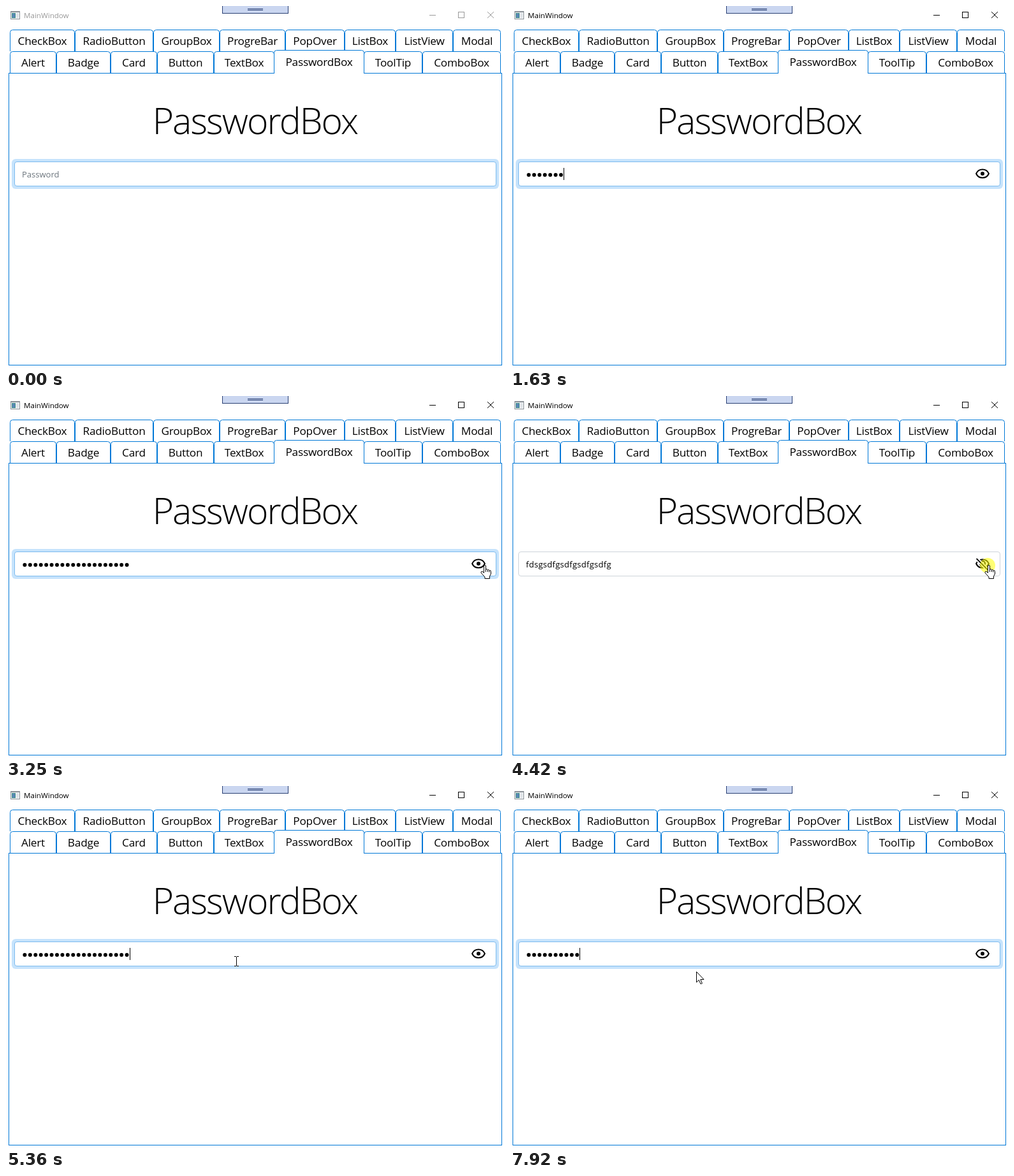
An HTML page with a canvas for the animation above (8000 ms loop, 781 by 568 pixels).

```html
<!DOCTYPE html>
<html lang="en">
<head>
<meta charset="utf-8">
<title>MainWindow</title>
<style>
  html, body { margin: 0; width: 100%; height: 100%; overflow: hidden; background: #fff; }
  canvas { display: block; }
</style>
</head>
<body>
<canvas id="stage" width="781" height="568"></canvas>
<script>
const ctx = document.getElementById('stage').getContext('2d');
const LOOP = 8000, TICK = 80;
const BLUE = '#0078d7';
const SANS = '"Open Sans", "Noto Sans", sans-serif';
const SECRET = 'fdsgsdfgsdfgsdfgsdfg';
const LABEL = { align: 'center', spacing: -0.2 };

const rows = [
  { y: 37, names: ['CheckBox', 'RadioButton', 'GroupBox', 'ProgreBar', 'PopOver', 'ListBox', 'ListView', 'Modal'],
    edges: [6, 108, 231, 335, 438, 531, 611, 701, 776] },
  { y: 71, names: ['Alert', 'Badge', 'Card', 'Button', 'TextBox', '', 'ToolTip', 'ComboBox'],
    edges: [6, 79, 164, 237, 326, 421, 561, 653, 776] }
];

// Pointer way points: time, x, y of the hot spot
const route = [
  [130, 681, 550], [290, 300, 385], [450, 99, 271], [600, 98, 271], [770, 98, 270],
  [2640, 180, 277], [2940, 743, 236], [3250, 751, 266], [4500, 751, 266],
  [4740, 600, 288], [5120, 377, 268], [5210, 375, 275],
  [6980, 58, 283], [7150, 70, 293], [7300, 70, 293], [7920, 292, 291]
];

const eye = new Path2D('M2.1 11.5C3.8 7.5 7.6 5 12 5s8.2 2.5 9.9 6.5C20.2 15.5 16.4 18 12 18S3.8 15.5 2.1 11.5z');
const arrow = new Path2D('M.5 .5V17L4.3 13.4 7 19.6 9.4 18.6 6.8 12.5H12z');
const hand = new Path2D('M5.5 12V2q0-1.5 1.5-1.5T8.5 2V7q2.5-1 3 .8 2-.8 2.6.8 2.4-.4 2.4 2V14L14.5 18v3.5H7V19L1.5 13q-1.5-2 .3-2.6Q4 10 5.5 12.5z');
const knuckles = new Path2D('M8.5 7v4M11.5 8v3M14 9v2.5');

const within = (t, ...spans) => spans.some(([a, b]) => t >= a && t < b);
const ticks = (t, from) => Math.floor((t - from) / TICK);
const caretX = n => Math.floor(25.4 + 8.43 * n);

function text(str, x, y, size, color, { align = 'left', weight = 400, spacing = 0 } = {}) {
  ctx.font = `${weight} ${size}px ${SANS}`;
  ctx.letterSpacing = spacing + 'px';
  ctx.textAlign = align;
  ctx.fillStyle = color;
  ctx.fillText(str, x, y);
}

function rect(x, y, w, h, color) {
  ctx.fillStyle = color;
  ctx.fillRect(x, y, w, h);
}

function line(color, width, ...pts) {
  ctx.strokeStyle = color;
  ctx.lineWidth = width;
  ctx.beginPath();
  pts.forEach(([x, y]) => ctx.lineTo(x, y));
  ctx.stroke();
}

function disc(x, y, r, color) {
  ctx.fillStyle = color;
  ctx.beginPath();
  ctx.arc(x, y, r, 0, 7);
  ctx.fill();
}

function box(x, y, w, h, r, fill, stroke) {
  ctx.beginPath();
  ctx.roundRect(x, y, w, h, r);
  ctx.fillStyle = fill;
  ctx.fill();
  if (stroke) {
    ctx.strokeStyle = stroke;
    ctx.lineWidth = 1;
    ctx.stroke();
  }
}

function at(x, y, draw) {
  ctx.save();
  ctx.translate(x, y);
  draw();
  ctx.restore();
}

function outlined(path) {
  ctx.fillStyle = '#fff';
  ctx.fill(path);
  ctx.strokeStyle = '#000';
  ctx.lineWidth = 1;
  ctx.stroke(path);
}

function tab(a, b, y, bottom) {
  const l = a + 0.5, r = b - 0.5, top = y + 0.5;
  ctx.beginPath();
  ctx.moveTo(l, bottom);
  ctx.arcTo(l, top, r, top, 4);
  ctx.arcTo(r, top, r, bottom, 4);
  ctx.lineTo(r, bottom);
  ctx.fillStyle = '#fff';
  ctx.fill();
  ctx.strokeStyle = BLUE;
  ctx.lineWidth = 1;
  ctx.stroke();
}

function titleBar(active) {
  const ink = active ? '#000' : '#999';
  rect(7, 8, 15, 13, '#8b9197');
  rect(8, 10, 13, 10, '#f4f6f8');
  rect(9, 11, 6, 8, '#3f8f86');
  rect(10, 12, 4, 6, '#5a86b8');
  rect(16, 11, 4, 8, '#dfe3e7');
  text('MainWindow', 28, 19, 11.6, ink);
  rect(664, 14, 10, 1, ink);
  ctx.strokeStyle = ink;
  ctx.lineWidth = 1;
  ctx.strokeRect(709.5, 9.5, 9, 9);
  line(ink, 1, [755, 9], [765, 19]);
  line(ink, 1, [765, 9], [755, 19]);

  rect(339, 0, 104, 12, '#293f73');
  rect(340, 0, 102, 11, '#cad6f0');
  rect(379, 4, 24, 1, '#293f73');
  rect(379, 6, 24, 1, '#293f73');
}

function tabs() {
  ctx.strokeStyle = BLUE;
  ctx.lineWidth = 1;
  ctx.strokeRect(4.5, 105.5, 773, 458);
  for (const { y, names, edges } of rows) {
    names.forEach((name, i) => {
      const a = edges[i], b = edges[i + 1];
      if (!name) return;
      tab(a, b, y, y + 34);
      text(name, (a + b) / 2, y + 24, 17.2, '#000', LABEL);
    });
  }
  tab(420, 562, 69, 106);
  text('PasswordBox', 491, 94, 17.2, '#000', LABEL);
  text('PasswordBox', 390.5, 201, 57, '#000', { align: 'center', weight: 300, spacing: -1.9 });
}

function drawEye(crossed) {
  at(729, 251.5, () => {
    ctx.strokeStyle = '#000';
    ctx.lineWidth = 2;
    ctx.stroke(eye);
    if (crossed) {
      ctx.beginPath();
      ctx.arc(12, 11.5, 4, 0, 7);
      ctx.stroke();
      line('#fff', 5.5, [2, 3], [21, 22]);
      line('#000', 1.9, [2.6, 3.6], [20.3, 21.3]);
    } else {
      disc(12, 11.5, 3, '#000');
    }
  });
}

function dotCount(t) {
  if (t < 1300) return 0;
  if (t < 2180) return Math.min(14, Math.floor(2.4 + 1.167 * Math.floor((t - 1300) / 79)));
  if (t < 6220) return Math.min(20, 15 + ticks(t, 2180));
  if (t < 7300) return 0;
  return Math.min(10, 2 + Math.floor((t - 7300) / 77.5));
}

function field(t) {
  const n = dotCount(t);
  const focused = !within(t, [3480, 5210]);
  const shown = within(t, [3480, 4500]);
  if (focused) box(9, 240, 764, 47, 6, '#c6e3fc');
  box(13.5, 244.5, 755, 38, 3.5, '#fff', focused ? '#7dbbee' : '#ced4da');

  if (within(t, [5440, 6220])) rect(25, 254, 169, 19, '#99c9ef');
  if (!n) {
    text('Password', 25, 269, 13, '#6c757d');
  } else if (shown) {
    text(SECRET, 25, 269, 13, '#000', { spacing: 0.27 });
  } else {
    for (let i = 0; i < n; i++) disc(29.4 + 8.43 * i, 265, 3, '#000');
  }
  if (n) drawEye(shown);
  if (within(t, [770, 3010], [5210, 5440], [6220, 6840], [7300, LOOP])) {
    rect(caretX(n), 254, 1, 19, '#000');
  }
}

function pointerAt(t) {
  let i = route.length - 1;
  while (i && route[i][0] > t) i--;
  const a = route[i], b = route[i + 1] || a;
  const u = b === a ? 0 : ticks(t, a[0]) * TICK / (b[0] - a[0]);
  return [1, 2].map(k => Math.round(a[k] + (b[k] - a[k]) * u));
}

function pointer(t) {
  if (!within(t, [130, 1010], [2640, 5440], [6980, LOOP])) return;
  const [x, y] = pointerAt(t);
  const inField = y > 244 && y < 284;
  const overEye = inField && x > 728;
  if (within(t, [770, 840], [3410, 4500], [5210, 5290])) {
    disc(overEye ? x - 2 : x, y, 12, 'rgba(255, 255, 0, 0.55)');
  }
  if (overEye) {
    at(x - 7, y - 1, () => {
      outlined(hand);
      ctx.stroke(knuckles);
    });
  } else if (inField) {
    rect(x, y - 7, 1, 14, '#000');
    for (const dy of [-8, 7]) {
      rect(x - 3, y + dy, 3, 1, '#000');
      rect(x + 1, y + dy, 3, 1, '#000');
    }
  } else {
    at(x, y, () => outlined(arrow));
  }
}

function draw(t) {
  rect(0, 0, 781, 568, '#fff');
  titleBar(t >= 770);
  tabs();
  field(t);
  pointer(t);
}

const start = performance.now();
function frame() {
  draw((performance.now() - start) % LOOP);
  requestAnimationFrame(frame);
}
frame();
</script>
</body>
</html>
```
